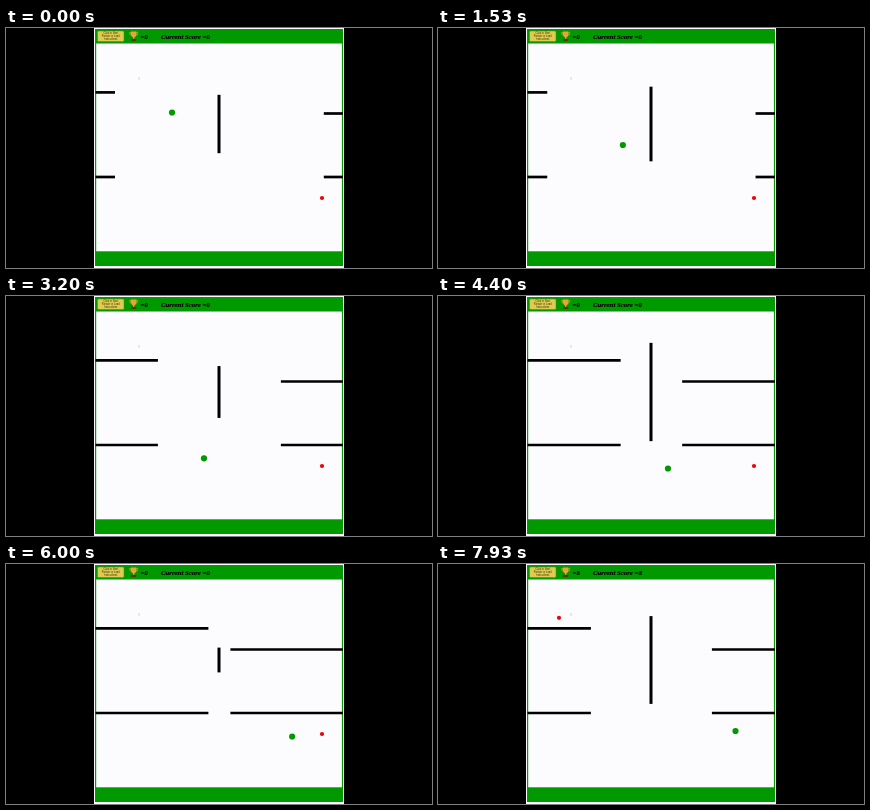
These frames come from a looping animation (426 by 240 pixels, 8000 ms). An HTML page:

```html
<!DOCTYPE html>
<html lang="en">
<head>
<meta charset="utf-8">
<title>Moving walls</title>
<style>
  html, body { margin: 0; width: 100%; height: 100%; overflow: hidden; background: #000; }
  svg { display: block; width: 100%; height: 100%; }
  .score { font: italic bold 6.8px "Liberation Serif", serif; fill: #000; stroke: #000; stroke-width: .15; }
  .label { font: 2.6px "Liberation Sans", sans-serif; fill: #3c3408; text-anchor: middle; }
  .wall { stroke: #000; stroke-width: 2.7; }
</style>
</head>
<body>
<svg viewBox="0 0 426 240">
  <rect width="426" height="240" fill="#000"/>
  <rect x="88" width="250" height="240" fill="#fcfcfe"/>
  <g fill="#009a00">
    <rect x="89" y="1" width="248" height="14.5"/>
    <rect x="89" y="223.3" width="248" height="14.7"/>
    <rect x="89" y="15" width="1.2" height="209"/>
    <rect x="335.9" y="15" width="1.1" height="209"/>
  </g>
  <rect x="91.5" y="3" width="26.5" height="10.5" rx="1.2" fill="#e0ca50" stroke="#75791c" stroke-width=".5"/>
  <g class="label">
    <text x="104.8" y="6.1">Click to Start</text>
    <text x="104.8" y="9">Restart or Load</text>
    <text x="104.8" y="11.9">Instructions</text>
  </g>
  <g fill="#e3a82c">
    <path d="M125 3.6h5.4v3q-.4 2.7-2.7 2.9q-2.3-.2-2.7-2.9z"/>
    <path d="M125 4.6h-1.3q.1 2.6 2 2.8M130.4 4.6h1.3q-.1 2.6-2 2.8" fill="none" stroke="#e3a82c" stroke-width=".8"/>
    <rect x="127" y="9" width="1.4" height="2"/>
    <rect x="125.2" y="10.8" width="5" height="2.2" fill="#5a3410"/>
  </g>
  <text class="score" id="best" x="134.6" y="10.8"></text>
  <text class="score" id="score" x="155" y="10.8"></text>
  <rect x="132.4" y="49.2" width="1.2" height="2.4" fill="#d0d0dc"/>
  <g class="wall">
    <line id="l1" x1="89.5" y1="64.4" y2="64.4"/>
    <line id="l2" x1="89.5" y1="149" y2="149"/>
    <line id="r1" x1="337" y1="85.5" y2="85.5"/>
    <line id="r2" x1="337" y1="149" y2="149"/>
    <line id="mid" x1="213" x2="213" stroke-width="3"/>
  </g>
  <circle id="food" r="2.1" fill="#f00000"/>
  <circle id="ball" r="3.1" fill="#009a00"/>
</svg>
<script>
const LOOP = 8000, FPS = 15, EATEN = 6720;
const WALL_SPEED = 0.0256, BALL_SPEED = 0.0351, BALL_DELAY = 70;

// Steering: right/left and down/up moves, one after another
const moves = [[0, 32.5], [32, 0], [0, 55.5], [125, 0], [0, -5.5], [-40, 0]];

const $ = id => document.getElementById(id);
const set = (id, attrs) => {
  for (const k in attrs) $(id).setAttribute(k, attrs[k]);
};

// Bounce a distance between 0 and span
const bounce = (d, span) => span - Math.abs(Math.abs(d) % (2 * span) - span);

function ballAt(t) {
  let x = 166, y = 84.5;
  let left = Math.max(0, t - BALL_DELAY) * BALL_SPEED;
  for (const [dx, dy] of moves) {
    const length = Math.abs(dx + dy);
    const p = Math.min(1, left / length);
    x += dx * p;
    y += dy * p;
    left -= length * p;
  }
  return { cx: x, cy: y };
}

function draw(t) {
  const d = t * WALL_SPEED;
  const side = bounce(d - 19.5, 123.5);
  const half = 10.3 + bounce(d + 18.9, 42.6);
  const eaten = t >= EATEN;

  for (const id of ["l1", "l2"]) set(id, { x2: 89.5 + side });
  for (const id of ["r1", "r2"]) set(id, { x2: 337.3 - side });
  set("mid", { y1: 96 - half, y2: 96 + half });
  set("ball", ballAt(t));
  set("food", eaten ? { cx: 121, cy: 53.8 } : { cx: 316, cy: 170 });

  const points = eaten ? 8 : 0;
  $("best").textContent = "=" + points;
  $("score").textContent = "Current Score =" + points;
}

const start = performance.now();
function tick() {
  const t = (performance.now() - start) % LOOP;
  draw(Math.floor(t * FPS / 1000 + 0.06) * 1000 / FPS);
  requestAnimationFrame(tick);
}
tick();
</script>
</body>
</html>
```
